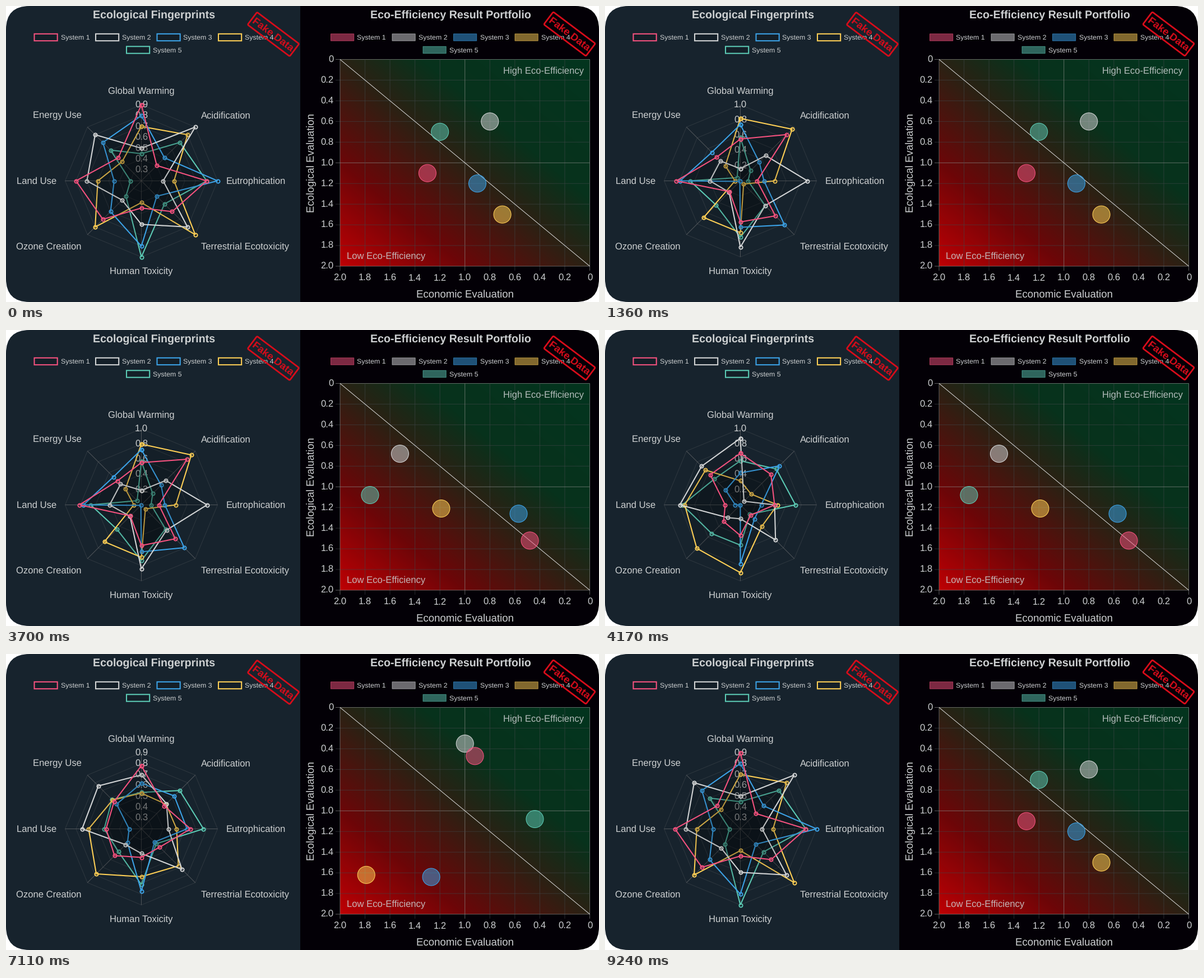
Write a matplotlib script that moves like this. It is 1058 by 529 pixels and loops after 9700 ms.

```python
import math

import numpy as np
import matplotlib.pyplot as plt
from matplotlib.animation import FuncAnimation
from matplotlib.patches import Circle, FancyBboxPatch, Polygon, Rectangle
from matplotlib.transforms import Affine2D

W, H, DPI = 1058, 529, 100
PX = 72 / DPI  # points per pixel
LOOP, INTERVAL = 9700, 25
STEP = 66.7  # the charts advance at about 15 pictures a second

plt.rcParams["font.family"] = "Liberation Sans"
plt.rcParams["text.hinting"] = "none"

TEXT = "#cdd0d1"
LEFT_BG, RIGHT_BG = "#17232d", "#030006"
STAMP = "#d80c1a"
COLORS = ["#f6527f", "#d3d5d6", "#3ca3e8", "#ffd056", "#5ccbb5"]
SMALL, BODY, HEAD, TITLE = 12.4, 16.6, 18.6, 19.6

# radar: one row per system, axes clockwise from the top
CX, CY, R = 241, 312, 136
AXES = ["Global Warming", "Acidification", "Eutrophication", "Terrestrial Ecotoxicity",
        "Human Toxicity", "Ozone Creation", "Land Use", "Energy Use"]
SPOKE = np.arange(8) * math.pi / 4
FINE, COARSE = (.2, .9, .1), (0, 1, .2)  # low, high, tick step

# the first data set hands the same profile on by one axis per system
PROFILE = [.9, .4, .8, .6, .45, .7, .8, .5]
RADAR_A = np.array([np.roll(PROFILE, i) for i in range(5)])
RADAR_A[4, 6] = .3
# later readings, in percent
RADAR_B = np.array([
    [55, 86, 22, 65, 54, 20, 84, 44],
    [16, 47, 88, 46, 87, 21, 40, 37],
    [74, 35, 31, 82, 61, 1, 79, 53],
    [82, 96, 45, 6, 68, 68, 7, 28],
    [57, 19, 10, 46, 74, 45, 66, 6]]) / 100
RADAR_C = np.array([
    [69, 54, 47, 15, 39, 32, 14, 57],
    [94, 3, 41, 67, 12, 24, 83, 75],
    [39, 76, 27, 21, 79, 0, 0, 25],
    [27, 13, 49, 43, 91, 82, 79, 68],
    [58, 71, 78, 15, 51, 54, 77, 52]]) / 100

# bubble chart: (economic, ecological) per system
X0, X1, Y0, Y1 = 595.5, 1041, 95, 464.5
BUBBLES_A = [(1.3, 1.1), (.8, .6), (.9, 1.2), (.7, 1.5), (1.2, .7)]
BUBBLES_B = [(.48, 1.52), (1.52, .68), (.57, 1.26), (1.19, 1.21), (1.76, 1.08)]
BUBBLES_C = [(.92, .47), (1, .35), (1.27, 1.64), (1.79, 1.62), (.44, 1.08)]


def radii(values, scale):
    low, high, _ = scale
    return (values - low) / (high - low) * R


def spokes(r):
    """Pixel places of radii on the eight axes."""
    return np.stack([CX + r * np.sin(SPOKE), CY - r * np.cos(SPOKE)], axis=-1)


def chart_xy(values):
    x, y = np.array(values).T
    return np.stack([X1 - x * (X1 - X0) / 2, Y0 + y * (Y1 - Y0) / 2], axis=-1)


def reset(ax):
    """Empty the stage; whole coordinates are pixel centres."""
    ax.clear()
    ax.set(xlim=(-.5, W - .5), ylim=(H - .5, -.5), aspect="auto")
    ax.axis("off")


def label(ax, x, y, s, size=BODY, ha="center", angle=0, **kw):
    """Text whose capitals are centred on the point, also when turned."""
    d, a = .344 * size, math.radians(angle)
    kw = {"color": TEXT, **kw}
    ax.text(x + d * math.sin(a), y - .5 + d * math.cos(a), s, fontsize=size * PX, ha=ha,
            va="baseline", rotation=angle, rotation_mode="anchor", **kw)


def line(ax, xs, ys, color, alpha=1, z=3):
    ax.plot(xs, ys, color=color, alpha=alpha, lw=PX, zorder=z, snap=False,
            solid_capstyle="butt")


def panels(ax):
    card = FancyBboxPatch((-.5, -.5), W, H, fc="white", ec="none",
                          boxstyle="round,pad=0,rounding_size=42")
    ax.add_patch(card)
    for x, w, color in ((0, 525, LEFT_BG), (525, W - 525, RIGHT_BG)):
        r = ax.add_patch(Rectangle((x - .5, -.5), w, H, fc=color, ec="none", zorder=1.5))
        r.set_clip_path(card)


def legend(ax, x, filled):
    for i, color in enumerate(COLORS):
        bx, by = (x + 109.5 * i, 55.5) if i < 4 else (x + 164.5, 78)
        box = dict(xy=(bx, by - 6.2), width=41.2, height=12.4, zorder=4, snap=False)
        ax.add_patch(Rectangle(fc=(color, .5) if filled else (0, 0, 0, .1), ec="none", **box))
        ax.add_patch(Rectangle(fc="none", ec=(color, .6) if filled else color,
                               lw=(1 if filled else 2.06) * PX, **box))
        label(ax, bx + 47, by, f"System {i + 1}", SMALL, "left")


def stamp(ax, x, y, angle=37):
    turn = Affine2D().rotate_deg(angle).translate(x, y) + ax.transData
    ax.add_patch(FancyBboxPatch((-47, -14), 94, 28, fc="none", ec=STAMP, lw=2.8 * PX,
                                boxstyle="round,pad=0,rounding_size=2",
                                transform=turn, zorder=8))
    label(ax, x, y, "Fake Data", 18.5, angle=-angle, color=STAMP, weight="bold", zorder=8)


def radar_grid(ax, scale):
    low, high, step = scale
    for x, y in spokes(R):
        line(ax, [CX, x], [CY, y], "#808080", .55)
    for value in np.arange(low + step, high + step / 2, step):
        r = radii(value, scale)
        ax.add_patch(Polygon(spokes(r), fc="none", ec=("#808080", .22), lw=PX, zorder=3))
        label(ax, CX, CY - r, f"{value:.1f}", zorder=4)
    # names sit just outside the tips, pushed up or down by half a line
    for name, a in zip(AXES, SPOKE):
        s, c = round(math.sin(a), 3), round(math.cos(a), 3)
        ha = ("center", "left", "right")[int(np.sign(s))]
        label(ax, CX + 151 * s, CY - 151 * c - 10 * np.sign(c), name, ha=ha)


def heat_field(ax):
    keys = [0, .25, .5, .66, 1]
    red, green, blue = (190, 108, 41, 8, 3), (0, 6, 34, 50, 53), (4, 8, 20, 28, 31)
    u, v = np.meshgrid(np.linspace(0, 1, 445), np.linspace(1, 0, 370))
    img = np.stack([np.interp((u + v) / 2, keys, c) for c in (red, green, blue)], axis=-1)
    ax.imshow(img / 255, extent=(X0, X1, Y1, Y0), aspect="auto", zorder=2)


def bubble_grid(ax):
    heat_field(ax)
    for k in range(11):
        x = X1 - (X1 - X0) * k / 10
        y = Y0 + (Y1 - Y0) * k / 10
        color, alpha = ("#8c8f8c", .65) if k % 5 == 0 else ("#404648", .6)
        line(ax, [x, x], [Y0, Y1 + 8], color, alpha)
        line(ax, [X0 - 8, X1], [y, y], color, alpha)
        name = f"{k / 5:.1f}" if k else "0"
        label(ax, x, 485.5, name)
        label(ax, 584, y, name, ha="right")
    line(ax, [X0, X1], [Y0, Y1], "#d8d8d8", z=4)
    label(ax, 1030, 114.5, "High Eco-Efficiency", ha="right", alpha=.87)
    label(ax, 608, 446, "Low Eco-Efficiency", ha="left", alpha=.87)
    label(ax, 818, 514, "Economic Evaluation", HEAD)
    label(ax, 543.5, 280, "Ecological Evaluation", HEAD, angle=90)


def backdrop(fig, ax, scale):
    """Paint everything that stands still and return it as a picture."""
    reset(ax)
    panels(ax)
    label(ax, 263.5, 15.5, "Ecological Fingerprints", TITLE, weight="bold")
    label(ax, 792.5, 15.5, "Eco-Efficiency Result Portfolio", TITLE, weight="bold")
    legend(ax, 50, filled=False)
    legend(ax, 579, filled=True)
    radar_grid(ax, scale)
    bubble_grid(ax)
    stamp(ax, 476.5, 50)
    stamp(ax, 1005, 49.5)
    ax.set(xlim=(-.5, W - .5), ylim=(H - .5, -.5))
    fig.canvas.draw()
    return np.array(fig.canvas.buffer_rgba())[..., :3]


fig = plt.figure(figsize=(W / DPI, H / DPI), dpi=DPI, facecolor="white")
ax = fig.add_axes([0, 0, 1, 1])
fine_bg = backdrop(fig, ax, FINE)
coarse_bg = backdrop(fig, ax, COARSE)

reset(ax)
scene = ax.imshow(fine_bg, aspect="auto", interpolation="nearest")

areas, outlines, bubbles = [], [], []
for i, color in enumerate(COLORS):
    z = 20 - 2 * i  # the first system lies on top
    areas.append(ax.add_patch(Polygon(np.zeros((8, 2)), fc=(0, 0, 0, .1), ec="none", zorder=z)))
    outlines += ax.plot([], [], "-o", color=color, lw=2.06 * PX, ms=6.2 * PX,
                        mfc=(0, 0, 0, .1), mec=color, mew=1.9 * PX, snap=False,
                        solid_joinstyle="miter", zorder=z + 1)
    bubbles.append(ax.add_patch(Circle((0, 0), 15.5, fc=(color, .52), ec=color,
                                       lw=1.03 * PX, zorder=z)))


def cycle(starts, poses):
    """Moves (start, from, to) that lead through the poses and back to the first."""
    return list(zip(starts, poses, poses[1:] + poses[:1]))


RADAR_MOVES = cycle([360, 3700, 6970], [spokes(radii(RADAR_A, FINE)),
                                        spokes(radii(RADAR_B, COARSE)),
                                        spokes(radii(RADAR_C, COARSE))])
BUBBLE_MOVES = cycle([2030, 5370, 8240],
                     [chart_xy(b) for b in (BUBBLES_A, BUBBLES_B, BUBBLES_C)])


def pose(moves, t):
    """Places at time t, easing out with the fourth power over a second."""
    now = moves[0][1]
    for start, a, b in moves:
        if t >= start:
            p = min(1, .01 + .0645 * int((t - start) / STEP))
            now = a + (b - a) * (1 - (1 - p) ** 4)
    return now


def update(i):
    t = (i + 1) * INTERVAL
    scene.set_data(coarse_bg if 360 <= t < 6970 else fine_bg)
    for pts, area, outline in zip(pose(RADAR_MOVES, t), areas, outlines):
        area.set_xy(pts)
        outline.set_data(*np.vstack([pts, pts[:1]]).T)
    for xy, bubble in zip(pose(BUBBLE_MOVES, t), bubbles):
        bubble.center = tuple(xy)
    return [scene, *areas, *outlines, *bubbles]


anim = FuncAnimation(fig, update, frames=LOOP // INTERVAL, interval=INTERVAL,
                     init_func=lambda: update(0), repeat=True, repeat_delay=0)
plt.show()
```
